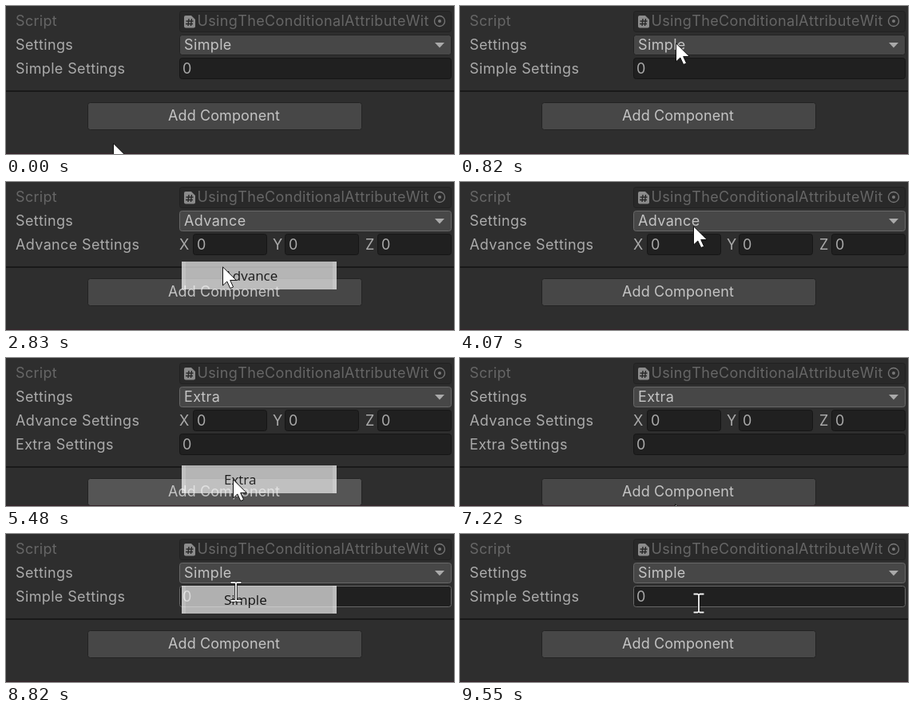
These frames come from a looping animation (561x186 px, 9620 ms). An HTML page:

```html
<!DOCTYPE html>
<html lang="en">
<head>
<meta charset="utf-8">
<title>Conditional settings</title>
<style>
  html, body { margin: 0; width: 100%; height: 100%; overflow: hidden; background: #2e2e2e; }
  svg { display: block; width: 561px; height: 186px; }
  text { font: 18px Inter, sans-serif; font-kerning: none; letter-spacing: .36px; fill: #ababab; white-space: pre; }
  .dim { fill: #666; }
  .bright { fill: #c4c4c4; }
  .caption { letter-spacing: .1px; }
  .menu text { font: 17px "Open Sans", "Noto Sans", sans-serif; letter-spacing: 0; fill: #111; }
  .field { fill: #202020; stroke: #161616; }
  .button { fill: #474747; stroke: #232323; }
  .field.hover, .focus { stroke: #686868; }
  .button.hover { fill: #555; }
</style>
</head>
<body>
<svg viewBox="0 0 561 186">
  <rect width="561" height="186" fill="#2e2e2e"/>
  <text class="dim" x="12" y="25">Script</text>
  <rect x="217.5" y="6.5" width="340" height="26" rx="3" fill="#292929" stroke="#212121"/>
  <path d="M225 12h7l5 5v8.500q0 2-2 2h-10q-2 0-2-2v-11.500q0-2 2-2z" fill="#8c8c8c"/>
  <path d="M229 16l-1 9M232.500 16l-1 9M225.500 19h9M225 22.500h9" stroke="#292929" stroke-width="1.400"/>
  <text class="dim" x="239.5" y="25">UsingTheConditionalAttributeWit</text>
  <circle cx="543" cy="19" r="6.5" fill="none" stroke="#777" stroke-width="1.3"/>
  <circle cx="543" cy="19" r="2" fill="#777"/>

  <text x="12" y="55">Settings</text>
  <rect id="drop" class="button" x="217.5" y="36.5" width="340" height="25" rx="3"/>
  <text id="choice" class="bright" x="223" y="55"></text>
  <path d="M537 46h12l-6 6.5z" fill="#aaa"/>

  <g id="rows"></g>

  <g id="footer">
    <rect y="106" width="561" height="2" fill="#191919"/>
    <rect id="add" class="button" x="102.5" y="121.5" width="343" height="34" rx="3"/>
    <text class="bright caption" x="203" y="144">Add Component</text>
  </g>
  <rect y="185" width="561" height="1" fill="#35232a"/>

  <g id="popup" class="menu">
    <rect x="217" y="62" width="200" height="111" rx="5" fill="#fefefe"/>
    <path id="check" d="M237 83l4 4.5 9-9" fill="none" stroke="#222" stroke-width="1.5"/>
    <text x="273" y="89">Simple</text>
    <text x="273" y="124">Advance</text>
    <text x="273" y="159">Extra</text>
  </g>
  <g id="picked" class="menu">
    <rect x="220" y="65" width="194" height="35" fill="#fefefe"/>
    <rect x="225" y="65" width="184" height="35" fill="#eee"/>
    <text id="pickedText" x="273" y="89"></text>
  </g>

  <path id="arrow" d="M.5.8V24l5.3-5 4 8.6 3.8-1.7-3.9-8.4h7.6z" fill="#fff" stroke="#111"/>
  <g id="beam" fill="none">
    <path d="M-7-11.5h5.500l1.500 1 1.500-1h5.500M-7 11.500h5.500l1.500-1 1.500 1h5.500M0-10.500v21" stroke="#161616" stroke-width="3.500"/>
    <path d="M-6.500-11.500h5l1.500 1 1.500-1h5M-6.500 11.500h5l1.500-1 1.500 1h5M0-10.500v21" stroke="#f4f4f4" stroke-width="1.800"/>
  </g>
</svg>
<script>
const LOOP = 9620;
const HOVER_DELAY = 250;
const names = ["Simple", "Advance", "Extra"];
const $ = id => document.getElementById(id);

// time, selected option
const modes = [[0, 0], [2640, 1], [5410, 2], [8820, 0]];

// opening time, pick time, checked item, picked item, fade time, opacity at the pick
const menus = [
  [1420, 2640, 0, 1, 420, .9],
  [4340, 5340, 1, 2, 420, .9],
  [7920, 8820, 2, 0, 270, .7]
];
const openSteps = [[-30, .3], [-12, .6], [-4, .84], [0, .93]];

// start, end, number of steps, x, y
const moves = [
  [70, 820, 11, 270, 46],
  [1830, 2240, 7, 271, 106],
  [2910, 3320, 7, 286, 178],
  [3590, 4070, 7, 292, 55],
  [4610, 4940, 6, 284, 152],
  [5550, 5760, 4, 269, 187],
  [7220, 7760, 9, 278, 52],
  [8050, 8120, 2, 277, 70],
  [8190, 8190, 1, 284, 53],
  [8680, 8680, 1, 270, 61],
  [8820, 8820, 1, 288, 72.5],
  [9550, 9550, 1, 299, 87]
];

const ease = p => Math.sin(p * Math.PI / 2) ** 2;
const inside = ([px, py], x, y, w, h) => px >= x && px < x + w && py >= y && py < y + h;

function cursorAt(t) {
  let x = 134, y = 172;
  for (const [start, end, count, toX, toY] of moves) {
    if (t < start) break;
    const step = count > 1 ? Math.floor((t - start) / (end - start) * (count - 1) + .01) + 1 : 1;
    const p = ease(Math.min(1, step / count));
    x += (toX - x) * p;
    y += (toY - y) * p;
  }
  return [x, y];
}

function fieldsFor(mode) {
  if (mode === 0) return [[218, 66, 340]];
  const xyz = [235, 350, 466].map(x => [x, 66, 92]);
  return mode === 1 ? xyz : [...xyz, [218, 96, 340]];
}

const label = (x, y, s) => `<text x="${x}" y="${y}">${s}</text>`;

function rowsMarkup(mode, fields, hovered) {
  let out = label(12, 85, mode === 0 ? "Simple Settings" : "Advance Settings");
  if (mode > 0) out += label(217, 85, "X") + label(334, 85, "Y") + label(450, 85, "Z");
  if (mode === 2) out += label(12, 115, "Extra Settings");
  fields.forEach(([x, y, w], i) => {
    out += `<rect class="field${i === hovered ? " hover" : ""}" x="${x - .5}" y="${y - .5}" width="${w}" height="26" rx="3"/>`
      + label(x + (w < 100 ? 4 : 3), y + 19, "0");
  });
  return out;
}

function drawMenus(t) {
  $("popup").style.opacity = $("picked").style.opacity = 0;
  let open = false;
  for (const [start, pick, checked, item, fade, first] of menus) {
    if (t >= start && t < pick) {
      const [dy, alpha] = openSteps[Math.min(3, Math.floor((t - start) / 66.6))];
      $("popup").style.opacity = alpha;
      $("popup").setAttribute("transform", `translate(0 ${dy})`);
      $("check").setAttribute("transform", `translate(0 ${checked * 35})`);
      open = true;
    }
    if (t >= pick && t < pick + fade) {
      const step = Math.floor((t - pick) / 67);
      const late = step - (first - .7) * 10;
      $("picked").style.opacity = Math.max(0, late < 0 ? first - step * .1 : .7 - late * .18);
      $("picked").setAttribute("transform", `translate(0 ${item * 35})`);
      $("pickedText").textContent = names[item];
    }
  }
  return open;
}

let lastKey = "";

function draw(t) {
  const mode = modes.filter(m => t >= m[0]).pop()[1];
  const shift = mode === 2 ? 30 : 0;
  const cursor = cursorAt(t);
  const open = drawMenus(t);
  const fields = fieldsFor(mode);
  const hovered = open ? -1 : fields.findIndex(([x, y, w]) => inside(cursor, x, y, w, 26));

  const key = mode + ":" + hovered;
  if (key !== lastKey) {
    $("rows").innerHTML = rowsMarkup(mode, fields, hovered);
    $("choice").textContent = names[mode];
    $("footer").setAttribute("transform", `translate(0 ${shift})`);
    lastKey = key;
  }
  $("drop").classList.toggle("focus", t >= 2640);

  // The button lights up only under a pointer that lingers on it.
  const lingers = [cursor, cursorAt(t - HOVER_DELAY)].every(c => inside(c, 102, 121 + shift, 344, 35));
  $("add").classList.toggle("hover", !open && lingers);

  const place = `translate(${Math.round(cursor[0])} ${Math.round(cursor[1] * 2) / 2})`;
  $("arrow").setAttribute("transform", place);
  $("beam").setAttribute("transform", place);
  $("arrow").style.display = hovered < 0 ? "" : "none";
  $("beam").style.display = hovered < 0 ? "none" : "";
}

const began = performance.now();
function tick() {
  draw((performance.now() - began) % LOOP);
  requestAnimationFrame(tick);
}
tick();
</script>
</body>
</html>
```
